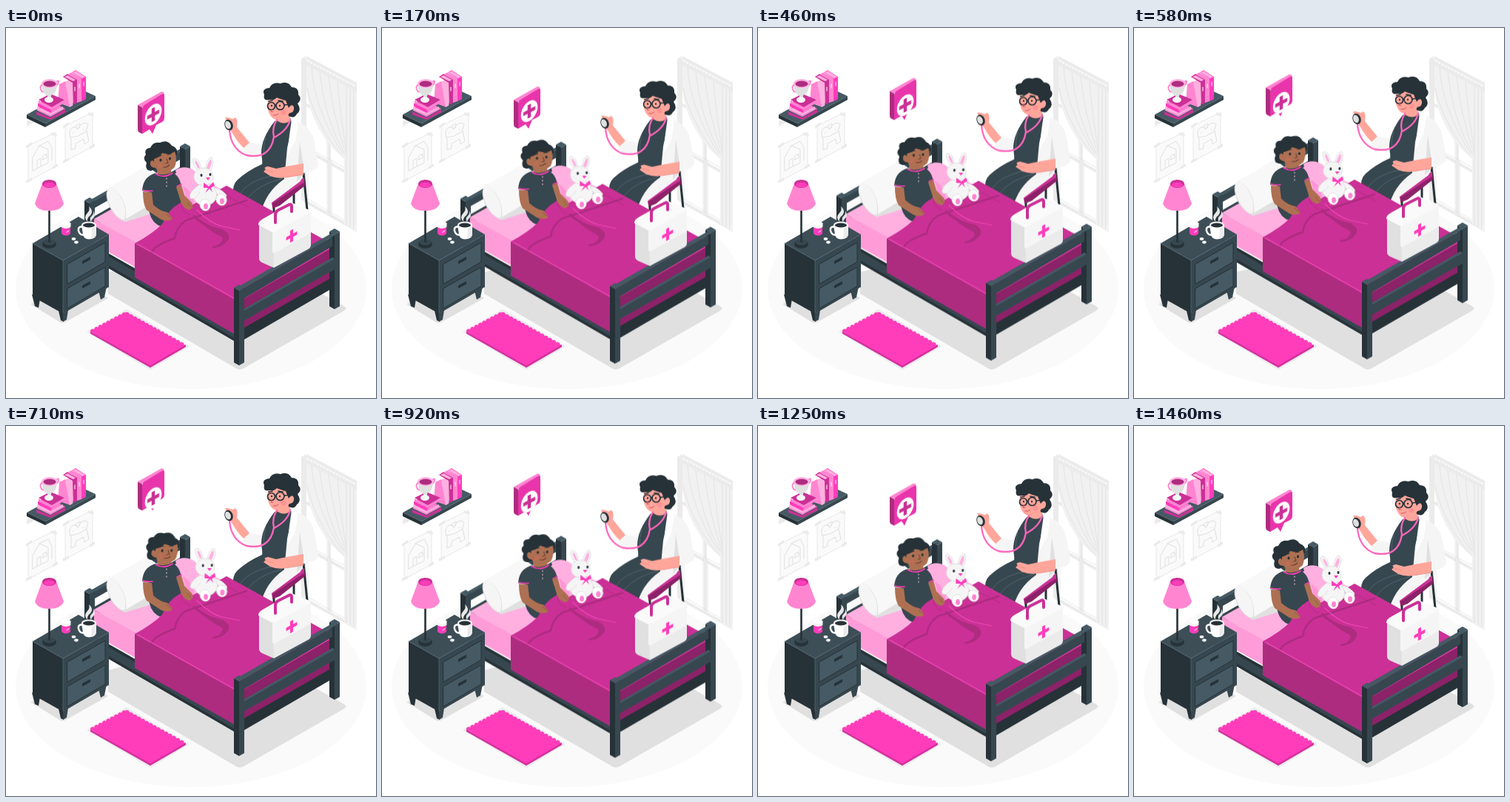
These frames come from a looping animation (500 px wide and 500 px high, 1500 ms). An HTML page without scripts:

```html
<!DOCTYPE html>
<html lang="en">
<head>
<meta charset="utf-8">
<title>Bedside visit</title>
<style>
  html, body { margin: 0; width: 100%; height: 100%; overflow: hidden; background: #fff; }
  svg { display: block; width: 100vw; height: 100vh; }
  :root { --ink: #263238; --slate: #37474f; --steel: #455a64; --pink: #ff3dbb; --soft: #ffb0e0; --plum: #cb3096; --wine: #ad2c80; --deep: #8c2268; }
  .ink { fill: var(--ink); } .slate { fill: var(--slate); } .steel { fill: var(--steel); }
  .pink { fill: var(--pink); } .soft { fill: var(--soft); } .rose { fill: #ff85d1; }
  .plum { fill: var(--plum); } .wine { fill: var(--wine); } .deep { fill: var(--deep); }
  .white { fill: #fff; } .pale { fill: #f5f5f5; } .mist { fill: #ebebeb; } .grey { fill: #e0e0e0; }
  .skin { fill: #ffa69b; } .brown { fill: #ae7052; }
  .line { fill: none; stroke-linecap: round; stroke-linejoin: round; }
  .s-ink { stroke: var(--ink); } .s-steel { stroke: #526873; } .s-pink { stroke: var(--pink); }
  .s-plum { stroke: var(--plum); } .s-wine { stroke: var(--wine); } .s-grey { stroke: #e0e0e0; } .s-mist { stroke: #ebebeb; }

  /* One straight rise and fall, with a short rest before the loop restarts. */
  .float, .bubble, .badge, .nod, .sway { animation: 1500ms linear infinite; }
  .float { animation-name: float; }
  .bubble { animation-name: bubble; }
  .badge { animation-name: badge; }
  .nod { animation-name: nod; transform-origin: 210px 194px; }
  .sway { animation-name: sway; transform-origin: 272px 242px; }
  @keyframes float { 0%, 97.2%, 100% { transform: none; } 48.6% { transform: translateY(-10.3px); } }
  @keyframes bubble { 0%, 97.2%, 100% { transform: none; } 48.6% { transform: translateY(-29.5px); } }
  @keyframes badge { 0%, 97.2%, 100% { transform: none; } 48.6% { transform: translateY(-20px); } }
  @keyframes nod { 0%, 97.2%, 100% { transform: rotate(0deg); } 48.6% { transform: rotate(8deg); } }
  @keyframes sway { 0%, 97.2%, 100% { transform: rotate(0deg); } 48.6% { transform: rotate(3deg); } }
</style>
</head>
<body>
<svg viewBox="0 0 500 500">
  <defs>
    <path id="plus" d="M-2.5-9h5v6.500h6.500v5h-6.500v6.500h-5v-6.500h-6.500v-5h6.500z"/>
    <g id="post-cap">
      <path class="steel" d="M0 4L7 0 14 4 7 8z"/>
    </g>
    <g id="foot-post">
      <path class="ink" d="M0 4L7 8V109L0 105z"/>
      <path class="slate" d="M7 8L14 4V105L7 109z"/>
      <use href="#post-cap"/>
    </g>
    <g id="drawer">
      <path class="steel" d="M83 319L134 290V316L83 346z"/>
      <path class="line s-ink" d="M83 319L134 290V316L83 346z"/>
      <path class="ink" d="M103 315L114 309V313L103 319z"/>
    </g>
    <g id="paper">
      <path fill="#fafafa" stroke="#e8e8e8" d="M0 18L37 0V46L0 66z"/>
      <path class="mist" d="M-3 18L5 13V17L-3 22zM31 0L39 3 38 6 30 3zM-3 65L5 61V65L-3 69zM33 46L40 42V46L33 50z"/>
    </g>
  </defs>

  <!-- Room -->
  <rect width="500" height="500" fill="#fff"/>
  <ellipse cx="250" cy="352" rx="237" ry="136" fill="#fafafa"/>
  <path class="grey" d="M138 359L311 460Q316 463 321 460L457 382Q462 379 457 376L300 288 138 330z"/>
  <path class="grey" d="M33 373L72 397Q76 400 81 397L138 365 96 341z"/>

  <!-- Window -->
  <path class="mist" d="M399 42L405 38V236L399 232z"/>
  <path class="white" d="M405 40L472 76V274L405 236z"/>
  <path class="line s-mist" stroke-width="4" d="M404 42V234L470 271M437 120V252M406 165L460 195M406 104L440 122"/>
  <path class="line s-grey" stroke-width=".7" d="M408 160V234M434 142V248M440 180V252M406 161L460 190M406 230L470 267"/>
  <path fill="#f1f1f1" d="M406 38L474 74V276L457 265V176Q440 164 427 143 408 112 406 82z"/>
  <path class="mist" d="M406 38L474 74V86L406 50z"/>
  <path class="line" stroke="#fafafa" stroke-width="2" stroke-dasharray="2 3" d="M407 44L473 79"/>
  <path class="line s-grey" stroke-width=".8" d="M413 53Q416 108 455 170M424 60Q430 122 458 171M436 66Q442 120 459 168M448 72Q452 120 460 166M460 79V266M465 82V269M470 84V272M407 82Q420 135 457 176"/>

  <!-- Wall drawings -->
  <use href="#paper" x="30" y="141"/>
  <use href="#paper" x="80" y="114"/>
  <g class="line s-grey">
    <path d="M36 175L45 159 57 164V182L36 193zM45 159L57 153 62 162V179M42 189V179L47 176V187M50 173L55 170V175L50 178z"/>
    <path d="M86 140Q91 129 97 137 103 124 111 130L108 140 97 146 87 148zM88 149L88 165 94 162 94 156 105 150 106 157 112 153 109 139M97 137Q92 131 97 131 102 126 99 135M90 142H91M104 137H105"/>
  </g>

  <!-- Shelf -->
  <path class="mist" d="M28 126L35 122 40 127 28 133z"/>
  <path class="steel" d="M28 117L95 80 121 92 53 129z"/>
  <path class="ink" d="M28 117L53 129V134L28 122z"/>
  <path class="slate" d="M53 129L121 92V97L53 134z"/>
  <path class="rose" d="M72 76L80 72 93 79 87 107 70 101z"/>
  <path class="soft" d="M80 73L85 70 95 77 90 105 86 107z"/>
  <path class="plum" d="M77 66L83 62 96 68V101L91 104 90 74z"/>
  <path class="rose" d="M83 63L88 60 102 68V99L96 101V70z"/>
  <path class="pink" d="M89 60L94 57 108 66V96L102 99V68z"/>
  <path class="soft" d="M90 60L94 58 107 66 103 68zM79 66L83 64 94 70 91 72z"/>
  <path class="line" stroke="#fff" d="M93 80V85M99 76V81M105 73V78"/>
  <path class="plum" d="M41 113L60 121 80 110V114L60 124 41 117z"/>
  <path class="rose" d="M41 111L61 99 80 109 60 120z"/>
  <path class="soft" d="M42 106L61 115 77 106V109L60 118 42 110z"/>
  <path class="pink" d="M43 102L61 92 79 101 61 112zM43 102L61 111V115L43 106z"/>
  <path class="plum" d="M44 97L60 89 79 97 62 107z"/>
  <path class="rose" d="M44 98L62 107 79 97V101L62 111 44 102z"/>
  <path class="line" stroke="#ff85d1" stroke-width="2" d="M50 76Q44 79 48 85 51 88 54 84M68 73Q73 69 70 76L65 81"/>
  <path class="grey" d="M49 76Q49 90 56 91V95H61V91Q69 88 69 76z"/>
  <ellipse class="pale" cx="58" cy="97" rx="6" ry="4"/>
  <ellipse class="soft" cx="59" cy="75" rx="11" ry="6"/>
  <ellipse class="wine" cx="59" cy="75.500" rx="8.500" ry="4"/>

  <!-- Rug -->
  <path class="mist" d="M109 411L163 380 248 430 195 462z"/>
  <path class="line s-pink" stroke-width="4" stroke-dasharray="1 5" d="M116 409L162 385 242 429"/>
  <path class="pink" d="M114 410L162 384 243 429 195 457z"/>
  <path fill="#d630a0" d="M114 410L195 456 243 428V431L195 459 114 413z"/>

  <g class="float">
    <!-- Chair and doctor -->
    <path class="line s-ink" stroke-width="3" d="M362 236V272M402 196L407 246M389 220V250"/>
    <path class="plum" d="M358 233L385 213 403 202V211L370 239 360 242z"/>
    <path class="deep" d="M360 237L404 208V213L370 240 360 244z"/>
    <path class="pale" d="M359 131Q380 119 397 128 413 135 417 155L422 185Q421 193 402 196L398 207 359 236 345 246Q350 218 362 196L345 168 332 175Q323 172 320 162L330 155 344 157z"/>
    <path class="grey" d="M397 153L402 186 400 200 393 207zM345 168L348 157 352 168z"/>
    <path class="slate" d="M363 126L384 121 387 131 380 162 377 194 346 191Q347 180 345 169 345 149 363 126z"/>
    <path class="slate" d="M346 184Q326 193 313 205 305 212 307 228L316 250 344 252Q350 222 376 204L377 187z"/>
    <path class="line" stroke="#526873" stroke-width=".9" d="M315 226Q325 207 359 200M323 236Q335 213 372 204M351 148Q347 160 349 170"/>
    <path class="white" d="M386 124L395 128 391 153 380 172 383 145z"/>
    <path class="skin" d="M402 183Q378 187 365 190L354 187Q347 188 351 191L348 194 357 200Q367 204 378 202L402 198z"/>
    <path class="line" stroke="#ee8179" stroke-width=".7" d="M350 192L361 195M378 202L402 198"/>
    <path class="skin" d="M321 162Q311 152 306 142L298 132Q295 122 300 121L307 123 309 121Q314 122 312 134L329 155z"/>
    <path class="line" stroke="#ffa69b" stroke-width="3" d="M298 122L308 127"/>
    <path class="skin" d="M366 112L384 110 384 125Q376 132 366 125z"/>
    <path class="ink" d="M349 90Q345 82 356 81 360 72 371 75 381 71 386 80 396 80 395 90 401 96 394 102 400 111 393 116 390 123 382 119L376 98 356 97Q347 99 349 90z"/>
    <path class="skin" d="M354 97Q361 99 366 94 374 97 378 98L382 108Q387 101 389 107 390 114 383 115 377 125 367 124 359 123 356 116 352 108 354 97z"/>
    <path class="line s-ink" stroke-width="1.700" d="M364 105H365M376 104L384 103M355 99L360 98M368 98L374 99"/>
    <circle class="line s-ink" stroke-width="1.700" cx="358.500" cy="105.500" r="5"/>
    <circle class="line s-ink" stroke-width="1.700" cx="370.500" cy="105" r="5.500"/>
    <circle class="ink" cx="359" cy="105" r="1.200"/><circle class="ink" cx="370" cy="105" r="1.200"/>
    <path class="line" stroke="#d4516b" d="M360 109L358 113 361 113M361 118Q365 119 368 116"/>
    <circle fill="#ff7d8e" opacity=".5" cx="375" cy="114" r="3.500"/>
    <path class="line" stroke="#ff65bd" stroke-width="2.300" d="M302 138Q304 164 325 172 357 178 362 147 359 135 366 124M362 148Q380 139 384 124"/>
    <ellipse class="ink" cx="301" cy="131" rx="5.500" ry="7.500" transform="rotate(-20 301 131)"/>
    <ellipse class="grey" cx="300" cy="131" rx="3.700" ry="5.500" transform="rotate(-20 300 131)"/>

    <!-- Headboard, mattress, pillows -->
    <path class="slate" d="M113 233L242 160V174L113 247zM113 258L242 184V197L113 271z"/>
    <path class="steel" d="M117 231L238 162 242 164 120 234z"/>
    <path class="ink" d="M106 233L113 237V300L106 296zM235 160L242 164V226L235 222z"/>
    <path class="slate" d="M113 237L120 233V300H113zM242 164L249 160V226H242z"/>
    <use href="#post-cap" x="106" y="229"/>
    <use href="#post-cap" x="235" y="156"/>
    <path class="ink" d="M120 294L310 402V424L120 314z"/>
    <path class="slate" d="M120 298L310 407V420L120 310z"/>
    <path class="soft" d="M119 258L237 192 300 222 180 293z"/>
    <path fill="#ff9cd8" d="M119 258L180 292V326L119 292z"/>
    <path class="soft" d="M229 192Q240 185 252 191L264 200Q272 225 257 240L240 237z"/>
    <path class="rose" opacity=".6" d="M239 213Q252 220 254 239L245 237z"/>
    <path class="grey" d="M137 219L190 188 226 209 215 245 161 262Q148 257 140 242 133 226 137 219z"/>
    <path fill="#f8f8f8" d="M140 215Q164 202 188 187 206 192 216 218 216 240 194 239L162 258Q164 235 149 220 143 214 140 215z"/>
    <path class="pale" d="M140 215Q134 219 139 236 148 258 160 259 165 239 149 220 144 214 140 215z"/>

    <!-- Child -->
    <path class="slate" d="M192 242L237 235 233 252 211 269Q197 264 194 250z"/>
    <path class="brown" d="M204 189L223 190 224 201 205 202z"/>
    <path class="slate" d="M202 196Q213 201 224 195 235 199 237 215L236 240Q217 254 197 243L194 222 184 220Q185 201 202 196z"/>
    <path class="line s-pink" stroke-width="1.600" d="M202 197Q213 204 225 196M185 219Q191 221 198 220M231 214L237 211"/>
    <path class="line" stroke="#f3c1df" stroke-width="1.200" d="M217 203V214" stroke-dasharray="1 4"/>
    <g class="nod">
      <path class="ink" d="M190 182Q184 177 189 171 186 163 195 162 199 153 208 155 218 150 224 159 233 162 231 171L225 176 203 190 196 193Q187 193 190 182z"/>
      <path class="brown" d="M200 177Q208 174 211 169 222 172 228 167 232 177 228 188 218 198 206 193L202 189Q194 189 195 181 198 177 200 181z"/>
      <path class="line s-ink" stroke-width="1.200" d="M205 174L210 172M218 171L223 170"/>
      <ellipse class="ink" cx="209" cy="178.500" rx="1.500" ry="2"/>
      <ellipse class="ink" cx="221.500" cy="176.500" rx="1.500" ry="2"/>
      <path class="line" stroke="#6f3d30" stroke-width="1.100" d="M217 177L219 182 216 183M213 188Q217 189 221 185"/>
      <circle fill="#d9695f" opacity=".45" cx="208" cy="186" r="3"/>
    </g>

    <!-- Blanket -->
    <path class="wine" d="M174 291L313 367V416L174 337z"/>
    <path class="deep" d="M313 366L441 292V342L313 416z"/>
    <path class="plum" d="M174 291Q198 278 211 265 218 246 236 236L250 240 298 213 441 292V297L318 368Q313 370 308 367z"/>
    <path class="line s-wine" stroke-width="2.500" d="M197 349V303Q200 294 228 284 230 269 243 260L325 233M254 254Q264 267 292 273 304 280 298 287 292 295 280 296"/>
    <path class="wine" d="M255 254Q280 272 296 275 305 281 297 288 290 295 282 296 297 287 291 282 270 272 255 254z"/>
    <path class="line" stroke="#ed48b3" stroke-width="1.200" d="M258 246Q276 264 292 268L316 273M178 292L308 365M319 366L440 296"/>
    <path class="line s-wine" opacity=".8" d="M237 239Q238 248 249 253M286 220L327 242"/>
    <path class="brown" d="M185 221L197 222 199 239Q209 248 218 249L225 257Q222 263 210 259L190 246Q185 238 185 221z"/>
    <path class="brown" d="M230 215L237 212 241 226 251 236Q255 243 248 246 241 245 237 237z"/>
    <path class="line" stroke="#874f3b" stroke-width=".7" d="M217 252L224 257M245 236L250 242"/>

    <!-- Toy rabbit -->
    <g class="sway" stroke="#dedede" stroke-width=".8">
      <path class="pale" d="M258 192Q249 178 254 176 262 176 264 192M269 191Q272 174 278 175 283 183 275 195"/>
      <path class="soft" stroke="none" d="M259 189Q254 180 256 179 260 181 262 190zM271 190Q274 178 277 178 279 184 274 192z"/>
      <ellipse class="pale" cx="269" cy="225" rx="16" ry="15"/>
      <path class="pale" d="M257 215Q246 224 249 230 256 233 262 222M281 216Q291 217 298 226 297 234 288 229z"/>
      <ellipse class="pale" cx="267" cy="201" rx="13" ry="12"/>
      <ellipse class="white" cx="269" cy="239" rx="7" ry="8" transform="rotate(-15 269 239)"/>
      <ellipse class="white" cx="291" cy="232" rx="7" ry="8" transform="rotate(-25 291 232)"/>
      <g stroke="none">
        <ellipse class="rose" cx="270" cy="241" rx="3" ry="4"/><ellipse class="rose" cx="292" cy="234" rx="3" ry="4"/>
        <ellipse class="ink" cx="264" cy="199" rx="1.500" ry="2"/><ellipse class="ink" cx="276" cy="198" rx="1.500" ry="2"/>
        <path class="pink" d="M270 202H276L273 206zM274 214L267 209V216L273 216 269 223 275 217 279 222 277 216 282 213 280 208z"/>
      </g>
    </g>

    <!-- Footboard -->
    <use href="#foot-post" x="437" y="271"/>
    <path class="ink" d="M315 409L444 335V350L315 425z"/>
    <path class="steel" d="M315 349L444 275 448 278 319 353z"/>
    <path class="slate" d="M319 353L441 282V295L319 367z"/>
    <path class="steel" d="M319 381L441 310 444 312V326L319 397z"/>
    <path class="slate" d="M319 384L444 312V326L319 397z"/>
    <use href="#foot-post" x="308" y="347"/>

    <!-- First-aid bag -->
    <path class="grey" d="M342 264L362 275V324L346 317Q341 314 342 309z"/>
    <path class="mist" d="M361 276L412 248V293Q412 297 408 299L362 324z"/>
    <path fill="#fafafa" d="M341 266Q341 261 347 258L386 236 410 246Q413 248 409 251L362 277z"/>
    <path class="pale" d="M360 277L412 249V273Q412 277 408 279L365 303Q360 307 360 300z"/>
    <path class="line s-plum" stroke-width="4" d="M364 263V252Q364 248 368 246L382 239Q386 237 386 241V248"/>
    <use href="#plus" class="pink" transform="translate(386 281) skewY(-28) scale(.82 .9)"/>
  </g>

  <!-- Nightstand -->
  <path class="ink" d="M35 360L46 366 44 378 39 376zM71 382L78 385V397L74 395z"/>
  <path class="slate" d="M77 386L84 381 82 394 77 397zM125 355L136 349 133 364 128 367z"/>
  <path class="ink" d="M36 291L77 314V386L36 363z"/>
  <path class="slate" d="M77 314L139 279V350L77 386z"/>
  <path fill="#3d4e57" d="M36 291L98 255 139 279 77 314z"/>
  <path class="line s-steel" stroke-width=".8" d="M36 291L77 314 139 279M77 314V385"/>
  <use href="#drawer"/>
  <use href="#drawer" y="33"/>

  <!-- Lamp -->
  <ellipse class="ink" cx="58.500" cy="292" rx="9.500" ry="6"/>
  <ellipse class="slate" cx="58.500" cy="289.500" rx="8" ry="4"/>
  <path class="line s-ink" stroke-width="2.600" d="M58.500 244V289"/>
  <path class="rose" d="M49 210L39 237Q42 247 58 247 75 247 78 237L68 210z"/>
  <ellipse class="plum" cx="58.500" cy="210.500" rx="9.500" ry="5.500"/>
  <ellipse class="pink" cx="58.500" cy="212" rx="7.500" ry="3.500"/>

  <!-- Medicine and hot drink -->
  <path class="pink" d="M75 267H87V278Q81 283 75 278z"/>
  <path class="pale" d="M74.500 264H87.500V269Q81 273 74.500 269z"/>
  <ellipse class="white" cx="81" cy="264" rx="6.500" ry="3"/>
  <path class="line" stroke="#fff" d="M82 276L85 274"/>
  <g class="white">
    <ellipse cx="91.500" cy="285" rx="2.800" ry="1.900"/><ellipse cx="95" cy="289.500" rx="2.800" ry="1.900"/>
  </g>
  <path class="line" stroke="#fff" stroke-width="2.500" d="M105 269Q97 267 98 274 100 281 106 279"/>
  <path class="white" d="M102 266H122V279Q121 285 112 285.500 105 285 104 279z"/>
  <path class="mist" d="M116 270L122 267V279Q121 284 115 285z"/>
  <ellipse class="pale" cx="112" cy="266" rx="10" ry="4.500"/>
  <ellipse class="ink" cx="112" cy="266.500" rx="8" ry="3"/>
  <path fill="#e8e8e8" d="M110 262Q104 256 110 250 114 246 112 241 119 247 114 253 109 257 110 262zM115 262Q112 257 116 254 119 251 118 247 122 254 118 257 115 259 115 262z"/>

  <!-- Health bubble -->
  <g class="bubble">
    <path class="wine" d="M178 104L184 107V143L180 141Q178 140 178 137z"/>
    <path class="rose" d="M178 104L210 86 214 87 184 107z"/>
    <path fill="#e935ab" d="M184 109Q184 106 187 104L211 89Q214 87 214 91V122Q214 125 211 127L203 131 198 143 194 137 184 143z"/>
  </g>
  <g class="badge">
    <g transform="translate(199 117) skewY(-28)">
      <ellipse class="white" rx="11.300" ry="13.500"/>
      <use href="#plus" class="plum" transform="scale(.9 1)"/>
    </g>
  </g>
</svg>
</body>
</html>
```
